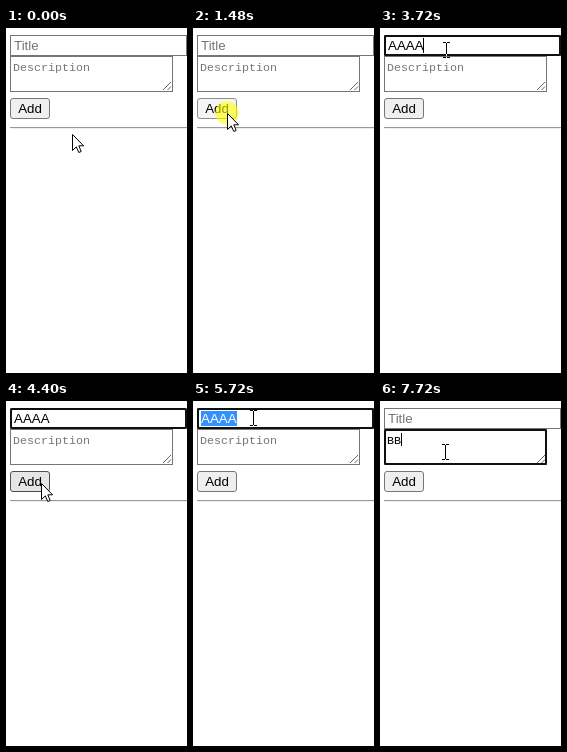
An HTML page for the animation above (8 s loop, 181 by 345 pixels).

```html
<!DOCTYPE html>
<html lang="en">
<head>
<meta charset="utf-8">
<title>Form recording</title>
<style>
  html, body { margin: 0; width: 100%; height: 100%; overflow: hidden; background: #fff; }
  svg { display: block; }
  text { white-space: pre; }
  .ui { font: 13.333px "Liberation Sans", Arial, sans-serif; }
  .mono { font: 11.667px "Liberation Mono", monospace; }
  .ring { fill: none; stroke: #101010; stroke-width: 2; }
  #beam { mix-blend-mode: difference; fill: #fff; }
</style>
</head>
<body>
<svg width="181" height="345" viewBox="0 0 181 345">
  <rect width="181" height="345" fill="#fff"/>

  <rect id="titleBox" x="4.5" y="7.5" width="176" height="20" fill="#fff"/>
  <rect id="titleRing" class="ring" x="5" y="8" width="175" height="19" rx="1.5"/>
  <rect id="selection" x="8" y="10" width="36" height="15" fill="#3390ff"/>
  <text id="titleText" class="ui" x="8" y="22"></text>
  <rect id="titleCaret" y="10" width="1" height="15"/>

  <rect id="descBox" x="4.5" y="28.5" width="162" height="35" fill="#fff"/>
  <path d="M157 62L165 54M161.500 62L165 58.500" stroke="#666" fill="none"/>
  <rect id="descRing" class="ring" x="5" y="29" width="161" height="34" rx="1.5"/>
  <text id="descText" class="mono" x="7" y="43"></text>
  <rect id="descCaret" y="32" width="1" height="13"/>

  <rect id="button" x="4.5" y="70.500" width="39" height="20" rx="2.5"/>
  <text class="ui" x="12.150" y="85">Add</text>

  <path d="M4 99.500H181" stroke="#9a9a9a"/>
  <path d="M5 100.500H181" stroke="#eee"/>

  <circle id="click" r="11.7" fill="#ff0" fill-opacity=".6"/>
  <path id="arrow" d="M.5 .5V16.500L4.300 12.900L6.800 18.500L9.200 17.500L6.800 11.800H11.600Z" fill="#fff" stroke="#000"/>
  <path id="beam" d="M-2-7H1V-6H2V-7H5V-6H2V8H5V9H2V8H1V9H-2V8H1V-6H-2Z"/>
</svg>
<script>
const LOOP = 8000, STEP = 40, START = [66, 106];
const el = Object.fromEntries([...document.querySelectorAll('[id]')].map(e => [e.id, e]));

// Pointer moves: start, end, x, y
const moves = [
  [480, 1080, 34, 85], [2280, 2320, 35, 86], [2440, 2720, 65, 21],
  [3840, 4400, 35, 82], [5120, 5400, 59, 16], [6400, 6600, 64, 50]
];
const clicks = [[1480, 1600], [1880, 2000], [2920, 3000], [4600, 4680],
  [4920, 5000], [5440, 5480], [5680, 5720], [6880, 7000]];
const focus = [[0, ''], [2920, 'title'], [4600, ''], [5440, 'title'], [6880, 'desc']];
const title = [[0, ''], [3280, 'A'], [3480, 'AA'], [3600, 'AAA'], [3720, 'AAAA'], [6320, '']];
const desc = [[0, ''], [7320, 'B'], [7720, 'BB']];

const latest = (track, t) => track.filter(key => key[0] <= t).pop();
const within = (t, [from, to]) => t >= from && t < to;
const ease = p => p * p * (3 - 2 * p);
const show = (node, on) => node.setAttribute('visibility', on ? 'visible' : 'hidden');

function pointerAt(t) {
  let [x, y] = START;
  for (const [from, to, toX, toY] of moves) {
    if (t <= from) break;
    const p = ease(Math.min(1, (t - from) / (to - from)));
    x += (toX - x) * p;
    y += (toY - y) * p;
  }
  return [Math.round(x), Math.round(y)];
}

function drawField(name, value, placeholder, x, advance, state) {
  const focused = state.focus === name;
  el[name + 'Box'].setAttribute('stroke', state.hover === name ? '#4f4f4f' : '#767676');
  show(el[name + 'Ring'], focused);
  const text = el[name + 'Text'], caret = el[name + 'Caret'];
  text.textContent = value || placeholder;
  text.setAttribute('fill', value ? '#000' : '#757575');
  caret.setAttribute('x', Math.floor(x + advance * value.length + 0.01));
  show(caret, focused && state.caret);
}

function render(time) {
  const t = Math.floor(time % LOOP / STEP) * STEP;
  const [x, y] = pointerAt(t);
  const pressed = clicks.some(span => within(t, span));
  const hover = y >= 7 && y < 28 ? 'title'
    : y >= 28 && y < 64 ? 'desc'
    : x < 44 && y >= 70 && y < 91 ? 'button' : '';
  const selected = within(t, [5680, 6320]);
  const lastInput = Math.max(...[focus, title, desc].map(track => latest(track, t)[0]));
  const state = {
    hover,
    focus: latest(focus, t)[1],
    caret: !selected && (t - lastInput) % 1000 < 500
  };

  drawField('title', latest(title, t)[1], 'Title', 8, 8.89, state);
  drawField('desc', latest(desc, t)[1], 'Description', 7, 7, state);
  show(el.selection, selected);
  if (selected) el.titleText.setAttribute('fill', '#fff');

  const [fill, stroke] = hover !== 'button' ? ['#efefef', '#767676']
    : pressed ? ['#f5f5f5', '#8d8d8d'] : ['#e5e5e5', '#4f4f4f'];
  el.button.setAttribute('fill', fill);
  el.button.setAttribute('stroke', stroke);

  const editing = hover === 'title' || hover === 'desc';
  for (const node of [el.click, el.arrow, el.beam]) {
    node.setAttribute('transform', `translate(${x} ${y})`);
  }
  show(el.click, pressed);
  show(el.arrow, !editing);
  show(el.beam, editing);
}

const began = performance.now();
function tick() {
  render(performance.now() - began);
  requestAnimationFrame(tick);
}
tick();
</script>
</body>
</html>
```
